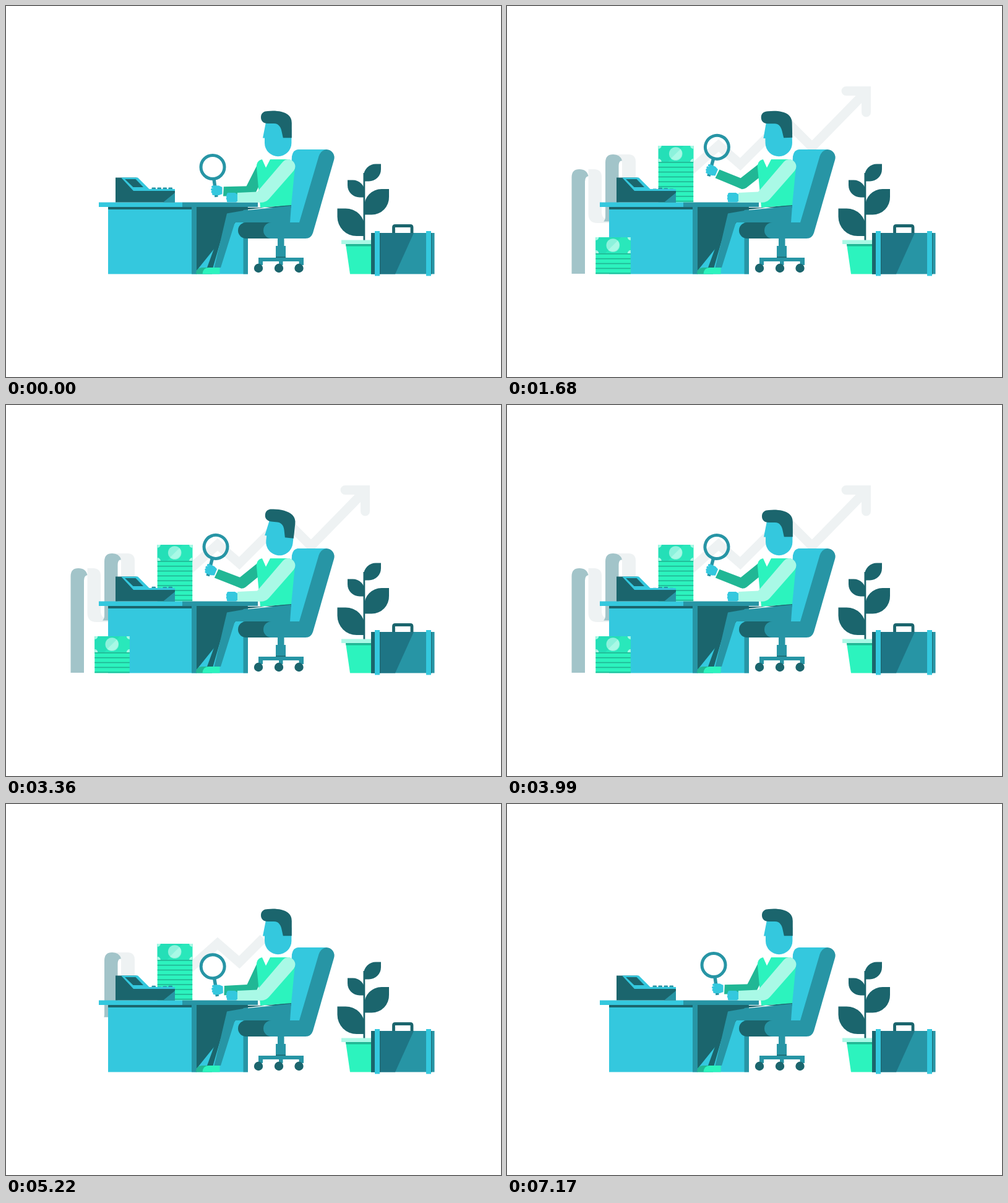
Recreate the animation shown at these times as an HTML page. Size 800 by 600 pixels, loop 7.2 s.

```html
<!DOCTYPE html>
<html lang="en">
<head>
<meta charset="utf-8">
<title>Desk work</title>
<style>
html, body { margin: 0; width: 100%; height: 100%; overflow: hidden; background: #fff; }
svg { display: block; width: 100vw; height: 100vh; }
.ink { fill: #1b656d; }
.teal { fill: #2795a5; }
.sky { fill: #34c8de; }
.mint { fill: #2cf3be; }
.leaf { fill: #21b795; }
.pale { fill: #a9f9e6; }
.mist { fill: #eef2f3; }
.fog { fill: #a2c4c9; }
.line { fill: none; }
</style>
</head>
<body>
<svg viewBox="0 0 800 600">
  <defs>
    <clipPath id="deskClip"><rect x="240" y="200" width="66" height="117.5"/></clipPath>
    <clipPath id="floorClip"><rect x="140" y="350" width="64" height="83.5"/></clipPath>
    <clipPath id="paper0"><rect x="160" width="60"/></clipPath>
    <clipPath id="paper1"><rect x="150" width="60"/></clipPath>
    <clipPath id="paper2"><rect x="100" width="90"/></clipPath>
    <clipPath id="paper3"><rect x="100" width="60"/></clipPath>
  </defs>

  <g class="line" stroke="#eef2f3" stroke-width="15">
    <path id="chart" d="M290 272L342 225.5L377 256L449 184L493 228L580 139"/>
    <path id="tip" d="M548 137.5H580.5V172" stroke-linecap="round"/>
  </g>

  <g clip-path="url(#paper2)"><path class="mist" d="M131.5 280V264H118C110 264 126 264 142 264Q153 265 153 276V332Q153 342 159 345H166V351H146Q131.5 351 131.5 336Z"/></g>
  <g clip-path="url(#paper3)"><path class="fog" d="M104.5 433V277Q104.5 264 117 264Q129 264 131.5 275Q126 276 126 284V433Z"/></g>
  <g clip-path="url(#paper0)"><path class="mist" d="M171 240H196Q208 240 208 252V300H186V252Z"/></g>
  <g clip-path="url(#paper1)"><path class="fog" d="M159 240V340Q159 346 156 348.5H170Q180.5 348 180.5 338V259Q180.5 250 186 250Q183 240 171.5 240Q159 240 159 253Z"/></g>

  <!-- desk -->
  <path class="sky" d="M165 325H391V433.5H165Z"/>
  <path class="ink" d="M165 325H300V329H165ZM308 325H391L308 428Z"/>
  <path class="teal" d="M300 325H308V433.5H300ZM383.5 329H391V433.5H383.5Z"/>

  <g clip-path="url(#deskClip)"><g id="deskStack"></g></g>
  <path class="sky" d="M150 317.5H285V325H150Z"/>
  <path class="teal" d="M285 317.5H407V325H285Z"/>
  <g clip-path="url(#floorClip)"><g id="floorStack"></g></g>

  <!-- adding machine -->
  <g id="keys" class="teal"></g>
  <path class="ink" d="M177 277.5H211L231 297H273V317.5H177Z"/>
  <path class="sky" d="M186 277.5H213L231.500 296H273V299H206Z"/>
  <path class="ink" d="M192 280H209.500L222 293H205.500Z"/>
  <path class="teal" d="M273 302V317.5H254Z"/>

  <!-- chair -->
  <path class="teal" d="M475 232H518A13 13 0 0 1 530 249L496 367Q493 376 484 376H429V350H458L463 242Q465 232 475 232Z"/>
  <path class="sky" d="M473 232H518Q508 234 505.500 243L474 350H457L462 243Q464 232 473 232Z"/>
  <path class="ink" d="M388 350H430V376H388A13 13 0 0 1 388 350Z"/>
  <path class="teal" d="M429 350H460V376H429A13 13 0 0 1 429 350ZM439 376H449.500V388H439ZM436 388H452V407H436ZM408 407H481V413H408ZM408 413H415V419H408ZM441 413H447.500V419H441ZM473.500 413H481V419H473.500Z"/>
  <path class="ink" d="M436 405.500H452V407H436Z"/>
  <g class="ink"><circle cx="408" cy="424" r="7.200"/><circle cx="441" cy="424" r="7.200"/><circle cx="473.500" cy="424" r="7.200"/></g>

  <!-- legs -->
  <path class="ink" d="M357 335L325 423H334.500L352 362ZM383 330L461 321V326H383Z"/>
  <path class="teal" d="M461 323L383 331L357 335.500L336.500 423H347L370 350H459Z"/>
  <path class="leaf" d="M307 433.500Q307 423 317 423H333V433.500Z"/>
  <path class="mint" d="M317.500 433.500Q318 423 328 423H345.500V433.500Z"/>

  <!-- raised arm -->
  <g id="upper"><path class="leaf" d="M407 255L388.500 291.500V307H398Q402 305 403.500 302L421 267Z"/></g>
  <g id="lower">
    <path d="M336 280L340 309" class="line" stroke="#2795a5" stroke-width="5.500"/>
    <circle cx="334" cy="260.500" r="19" class="line" stroke="#2795a5" stroke-width="5"/>
    <path class="leaf" d="M351.800 292.300L394 291.200A8 8 0 0 1 394 307.200L351 307.600Z"/>
    <path class="sky" d="M335 290.500H344L349.500 293V304L344 306H336Z"/>
    <path d="M334 292.500H340M333 296.700H340M333.500 300.700H340M335 304H340" class="line" stroke="#34c8de" stroke-width="4" stroke-linecap="round"/>
  </g>

  <!-- torso and resting arm -->
  <path class="mint" d="M414 248H458L467 260L461 322L411 326L405 262Q404 250 414 248Z"/>
  <path d="M413.500 247L420 261.500L427.500 247Z" fill="#fff"/>
  <path class="pale" d="M374 302L406 300.500L447 252.500A11 11 0 0 1 465 266.500L425 312Q420 317.800 412 317.800H374Z"/>
  <path class="sky" d="M359 302H370L374 304.500V316L371 317.500H359Q356 317 357 314Q355 312 356.500 309Q355 306 357 305Q356.500 302.500 359 302Z"/>

  <g id="head">
    <path class="sky" d="M420 188L415 213.500H418V221.500A21.700 21.700 0 0 0 461.400 221.500V200L440 182Z"/>
    <path class="ink" d="M423 190C416 190 412 186 412 180C412 173 417 170 423 170C434 168.500 449 170 456 176Q461.800 181 461.800 189V213.300H447.800L446 205C444.500 196 441 190 433 190Z"/>
  </g>

  <!-- plant -->
  <g id="plant" class="ink"></g>
  <path class="mint" d="M549 385H597V433.500H556Z"/>
  <path class="leaf" d="M549 384H597V388.500H549.500Z"/>
  <path class="pale" d="M542 378.500H597V385H542Z"/>

  <!-- briefcase -->
  <path d="M626.500 368V358Q626.500 355.500 629 355.500H653.500Q656 355.500 656 358V368" class="line" stroke="#1b656d" stroke-width="4.800"/>
  <path class="teal" d="M590 367H692.500V433.500H590Z"/>
  <path d="M590 367H659L629 433.500H590Z" fill="#1e7585"/>
  <path class="ink" d="M590 367H596V433.500H590ZM604 367H605.200V433.500H604ZM687 367H688V433.500H687Z"/>
  <path class="sky" d="M596 364H604V436.500H596ZM679 364H687V436.500H679Z"/>
</svg>
<script>
const LOOP = 7200;
const $ = id => document.getElementById(id);
const clamp = v => Math.max(0, Math.min(1, v));
const ramp = (t, from, to) => clamp((t - from) / (to - from));
const smooth = v => v * v * (3 - 2 * v);

// Eased value through [time, value] stops.
function track(t, stops) {
  for (let i = 1; i < stops.length; i++) {
    const [t0, v0] = stops[i - 1], [t1, v1] = stops[i];
    if (t <= t1) return v0 + (v1 - v0) * smooth(ramp(t, t0, t1));
  }
  return stops[stops.length - 1][1];
}

function noteStack(x, y, height) {
  const bottom = y + height;
  let s = `<rect class="mint" x="${x}" y="${y}" width="56.500" height="${height}"/>
    <rect x="${x}" y="${y}" width="56.500" height="26" fill="#24dfb7"/>
    <path d="M${x + 41} ${y}h15.500v26h-41z" fill="#29e8bb"/>
    <path class="pale" d="M${x} ${y}h5a5 5 0 0 1-5 5zM${x + 56.5} ${y}h-5a5 5 0 0 0 5 5zM${x} ${y + 26}h5a5 5 0 0 0-5-5zM${x + 56.5} ${y + 26}h-5a5 5 0 0 1 5-5z"/>
    <circle cx="${x + 28}" cy="${y + 13}" r="10.800" fill="#8cf2dc"/>
    <path class="pale" d="M${x + 35.6} ${y + 5.4}a10.800 10.800 0 0 1-15.200 15.200z"/>`;
  for (let ly = y + 26; ly < bottom - 1; ly += 7.85)
    s += `<rect class="leaf" x="${x}" y="${ly}" width="56.500" height="1.700"/>`;
  return s;
}

// Two opposite sharp corners: (x0,y0) and (x1,y1).
function leaf(x0, y0, x1, y1) {
  const k = 0.3, w = x1 - x0, h = y1 - y0, r = Math.abs(w) * (1 - k);
  const sweep = w * h > 0 ? 1 : 0;
  return `<path d="M${x0} ${y0}h${w * k}a${r} ${r} 0 0 ${sweep} ${w * (1 - k)} ${h * (1 - k)}V${y1}h${-w * k}a${r} ${r} 0 0 ${sweep} ${-w * (1 - k)} ${-h * (1 - k)}z"/>`;
}

$('deskStack').innerHTML = noteStack(244.7, 226, 92);
$('floorStack').innerHTML = noteStack(143.3, 374, 60);
$('plant').innerHTML = '<rect x="577.500" y="270" width="2.800" height="109"/>' +
  leaf(606, 255.5, 578, 283.5) + leaf(552, 281.5, 580, 309.5) +
  leaf(619, 296, 579, 337.5) + leaf(535.5, 327.5, 580, 372);
$('keys').innerHTML = [235.5, 244.5, 253.5, 262.5]
  .map(x => `<rect x="${x}" y="293.500" width="6.500" height="5" rx="1"/>`).join('');
const keys = [...$('keys').children];
const chartLength = $('chart').getTotalLength();

function reveal(id, top, bottom) {
  const r = $(id).firstElementChild;
  r.setAttribute('y', top);
  r.setAttribute('height', Math.max(0, bottom - top));
}

function drawPaper(t) {
  const length = 403 * Math.min(ramp(t, 0, 1555), 1 - ramp(t, 4220, 5770));
  const part = (start, size) => clamp((length - start) / size);
  reveal('paper0', 280 - 40 * part(0, 40), 300);
  reveal('paper1', 240, 240 + 110 * part(40, 108));
  reveal('paper2', 352 - 88 * part(148, 85), 352);
  reveal('paper3', 264, 264 + 169.5 * part(233, 170));
}

function drawChart(t) {
  const grow = Math.min(ramp(t, 40, 1300), 1 - ramp(t, 4500, 5750));
  $('chart').setAttribute('stroke-dasharray', `${chartLength * grow} 999`);
  $('chart').style.visibility = grow > 0 ? 'visible' : 'hidden';
  const size = smooth(ramp(grow, 0.9, 1));
  $('tip').setAttribute('transform', `translate(580 138) scale(${size}) translate(-580 -138)`);
  $('tip').style.visibility = size > 0 ? 'visible' : 'hidden';
}

function drawArm(t) {
  const p = track(t, [[0, 0], [520, 1], [4050, 0.95], [5000, -0.07], [7200, 0]]);
  const swing = 25.4 * p, a = (116.6 + swing) * Math.PI / 180;
  const ex = 413 + 43.5 * Math.cos(a), ey = 260.5 + 43.5 * Math.sin(a);
  $('upper').setAttribute('transform', `rotate(${swing} 413 260.500)`);
  $('lower').setAttribute('transform', `translate(${ex} ${ey}) rotate(${23.4 * p}) translate(-393.500 -299.400)`);
}

function drawStacks(t) {
  const desk = 92 * (1 - Math.min(smooth(ramp(t, 30, 530)), 1 - smooth(ramp(t, 5250, 5780))));
  const floor = 60 * (1 - Math.min(smooth(ramp(t, 250, 800)), 1 - smooth(ramp(t, 4600, 5100))));
  $('deskStack').setAttribute('transform', `translate(0 ${desk})`);
  $('floorStack').setAttribute('transform', `translate(0 ${floor})`);
}

function draw(t) {
  drawChart(t);
  drawPaper(t);
  drawStacks(t);
  drawArm(t);
  const tilt = track(t, [[0, 0], [620, 8.3], [950, 8.3], [1600, -1.2], [1800, -1.2], [2550, 7.3], [3200, 7.3], [3850, 0]]);
  $('head').setAttribute('transform', `rotate(${tilt} 440 242)`);
  const typing = Math.min(ramp(t, 60, 200), 1 - ramp(t, 5600, 5800));
  keys.forEach((key, i) => {
    const press = 2.2 * typing * (0.5 - 0.5 * Math.cos(t / 75 + i * 2.1));
    key.setAttribute('transform', `translate(0 ${press})`);
  });
}

const start = performance.now();
function tick() {
  draw((performance.now() - start) % LOOP);
  requestAnimationFrame(tick);
}
tick();
</script>
</body>
</html>
```
